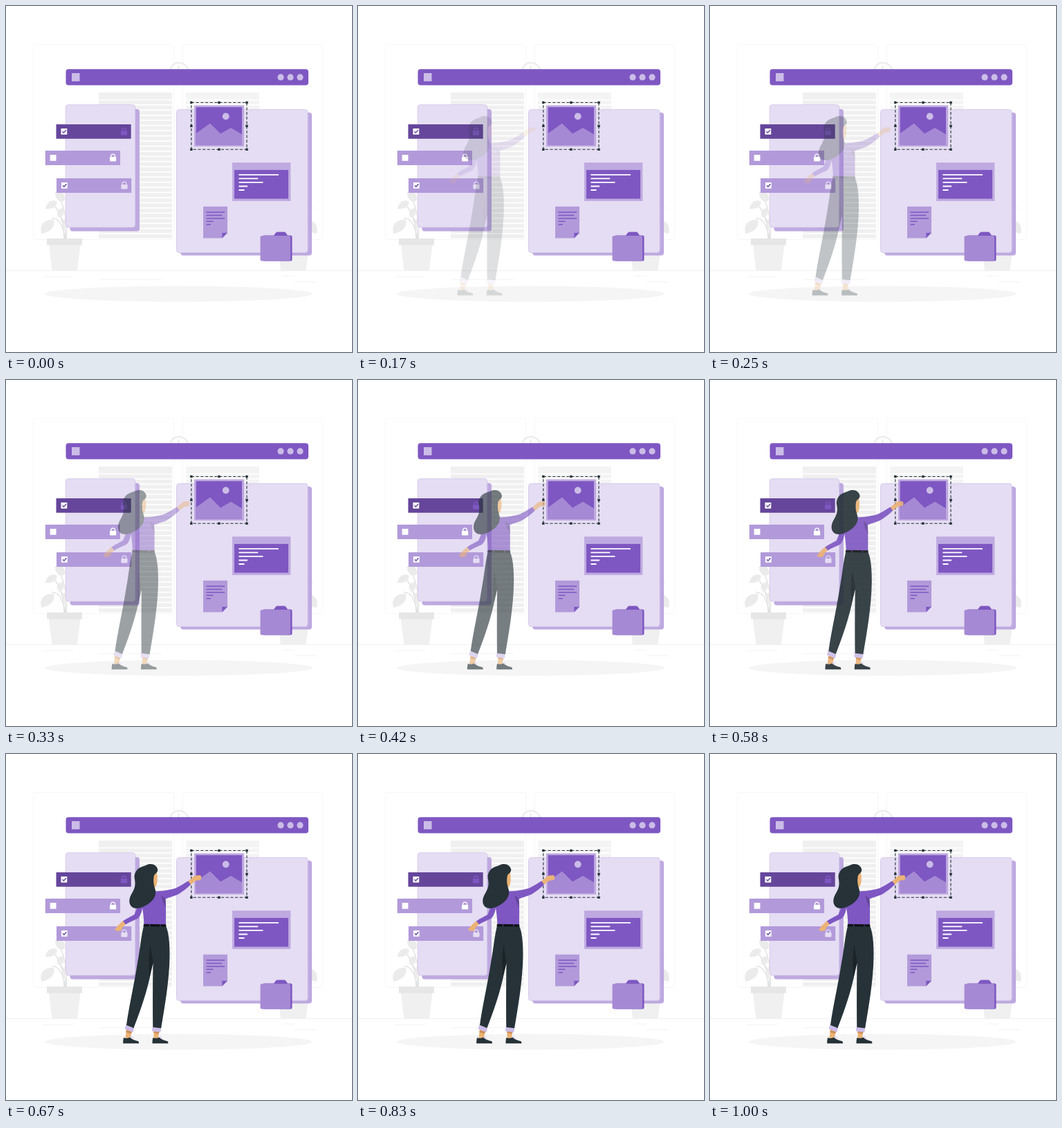
Write an HTML page that moves like this. It is 500 by 500 pixels and loops after 1.04 s.

```html
<!DOCTYPE html>
<html lang="en">
<head>
<meta charset="utf-8">
<title>Organising a page</title>
<style>
  html, body { margin: 0; width: 100%; height: 100%; overflow: hidden; background: #fff; }
  svg { display: block; width: 100vw; height: 100vh; }
  .main { fill: #7e57c2; }
  .t30 { fill: #a589d4; }
  .t40 { fill: #b29ada; }
  .t50 { fill: #bea9e0; }
  .t60 { fill: #cbbce7; }
  .t80 { fill: #e5ddf3; }
  .dark { fill: #263238; }
  .skin { fill: #ebb376; }
  .white { fill: #fff; }
  .line { fill: none; }
</style>
</head>
<body>
<svg viewBox="0 0 500 500">
  <defs>
    <g id="plant">
      <g class="line" stroke="#e0e0e0" stroke-width="1.3">
        <path d="M85 336C83 318 76 305 66 307M86 336C86 320 84 312 79 304M87 336C89 318 86 297 79 281M84 336C83 312 79 300 71 290"/>
      </g>
      <g fill="#ebebeb">
        <path d="M51 329C48 316 55 308 69 309C72 319 63 327 51 329Z"/>
        <path d="M57 293C58 284 65 279 73 282C76 289 67 294 57 293Z"/>
        <path d="M71 269C79 266 87 271 85 281C77 286 71 279 71 269Z"/>
        <path d="M77 306C71 300 73 293 82 292C86 299 82 304 77 306Z"/>
        <path d="M82 316C80 311 84 306 90 307C91 313 87 316 82 316Z"/>
      </g>
      <path fill="#f0f0f0" d="M62 345H107.500L103 382.500H66.500Z"/>
      <path fill="#e6e6e6" d="M59 336H110V345.500H59Z"/>
    </g>
    <g id="lock">
      <rect x="-4.600" y="-1.500" width="9.200" height="6.500" rx="1"/>
      <path d="M-2.900 -1V-2.400A2.900 2.900 0 0 1 2.900 -2.400V-1" fill="none" stroke-width="1.300"/>
    </g>
    <path id="shoe" d="M1 410C4 411 7 411 10 409.500C14 413 18 414 22 415Q23.500 416 23 418.200H.200Q0 414 1 410Z"/>
  </defs>

  <!-- room -->
  <g class="line" stroke="#f5f5f5" stroke-width=".8">
    <rect x="39.500" y="55.500" width="203" height="282" rx="2"/>
    <rect x="255.500" y="55.500" width="202" height="282" rx="2"/>
  </g>
  <g class="line" stroke="#ebebeb">
    <path stroke-width=".7" d="M0 382.500H500"/>
    <path stroke="#f2f2f2" stroke-width=".8" d="M53 391H97M135 395.500H225M399 390H417M417 398.500H449"/>
    <circle cx="250" cy="95.500" r="13.500" stroke-width="2.200"/>
    <path stroke-width="2" d="M249.500 86V96"/>
  </g>
  <g id="blinds" fill="#f0f0f0"></g>
  <use href="#plant"/>
  <use href="#plant" transform="matrix(-1 0 0 1 500 0)"/>
  <ellipse cx="249.500" cy="416" rx="193.500" ry="11.400" fill="#f5f5f5"/>

  <!-- title bar -->
  <rect class="main" x="86.500" y="91.300" width="350.500" height="23.200" rx="4"/>
  <g class="t60">
    <rect x="95" y="97" width="11.500" height="11.800"/>
    <circle cx="397" cy="102.900" r="4.600"/>
    <circle cx="411" cy="102.900" r="4.600"/>
    <circle cx="425" cy="102.900" r="4.600"/>
  </g>

  <!-- panels -->
  <g class="t50">
    <rect x="92.500" y="149" width="100.500" height="176.500" rx="4"/>
    <rect x="252.300" y="154" width="189.700" height="206.500" rx="4"/>
  </g>
  <g class="t80" stroke="#cbbce7" stroke-width=".7">
    <rect x="86.300" y="142.700" width="100.500" height="177.300" rx="4"/>
    <rect x="246.500" y="149.700" width="189.700" height="206.800" rx="4"/>
  </g>

  <!-- list rows -->
  <rect fill="#65469b" x="72.500" y="171" width="108.200" height="20.800"/>
  <rect class="t40" x="56.800" y="209" width="108.200" height="21"/>
  <rect class="t40" x="73" y="249" width="108.200" height="21"/>
  <path class="white" d="M79.500 177h8.800v8.800h-8.800zM63.700 215h8.800v8.800h-8.800zM80 255h8.800v8.800h-8.800z"/>
  <path class="line" stroke="#65469b" stroke-width="1.400" d="M81.500 181.200l1.900 2 3.500-4M82 259.200l1.900 2 3.500-4"/>
  <use href="#lock" x="170.500" y="181.800" fill="#7e57c2" stroke="#7e57c2" stroke-width="0"/>
  <use href="#lock" x="154.600" y="219.500" fill="#fff" stroke="#fff" stroke-width="0"/>
  <use href="#lock" x="171" y="259.500" fill="#e5ddf3" stroke="#e5ddf3" stroke-width="0"/>

  <!-- picture with selection -->
  <rect class="t50" x="272" y="143.500" width="72" height="59.500"/>
  <rect class="main" x="274.700" y="146.200" width="66.300" height="54.300"/>
  <path class="t30" d="M274.700 184L295 169.500L310 184.500L325 176L341 185.500V200.500H274.700Z"/>
  <circle class="t60" cx="317.700" cy="159.500" r="4.900"/>
  <rect class="line" x="267.800" y="139.500" width="80.200" height="67.800" stroke="#263238" stroke-width="1.100" stroke-dasharray="4.200 2.500"/>
  <g id="handles" class="dark"></g>

  <!-- text window -->
  <rect class="t50" x="327" y="226.300" width="84.300" height="55.500"/>
  <rect class="main" x="330" y="236.900" width="78" height="41.600"/>
  <path class="line" stroke="#fff" stroke-width="1.800" d="M336.400 243.900H394M336.400 249.400H364.200M336.400 254.900H371.400M336.400 260.500H349M336.400 266H344.500"/>

  <!-- note -->
  <path class="t40" d="M285 289.700H320V327.700L312.300 335.400H285Z"/>
  <path class="main" d="M312.300 327.700H320L312.300 335.400Z"/>
  <path class="line" stroke="#7e57c2" stroke-width="1.500" d="M289.500 298H316M289.500 302.500H312M289.500 306.900H316M289.500 311.300H299.500M289.500 315.700H296"/>

  <!-- folder -->
  <path class="main" d="M372 331.500H387L390 327.500Q390.800 326.500 392 326.500H402Q403.500 326.500 404.200 327.500L407 331.500H411Q413.500 331.500 413.500 334V366Q413.500 368.500 411 368.500H372Z"/>
  <rect class="t30" x="367.500" y="332" width="43.500" height="36.500" rx="2.500"/>

  <g id="woman">
    <!-- feet -->
    <path class="skin" d="M174 397L182 399L180 410.500Q176 413 172.500 410.500ZM213.500 399L221.500 400L220 410.500Q217 413 213.500 410.500Z"/>
    <path fill="#ce8f55" d="M174 399L182 401L181 404.500L173.500 402ZM213.500 400L221.500 401L221 404.500L213.500 403Z"/>
    <path class="t80" d="M179 410L181.500 406.500L185 412ZM220 410L222.500 406.500L227 412Z"/>
    <use href="#shoe" class="dark" x="169"/>
    <use href="#shoe" class="dark" x="211.300"/>
    <!-- trousers -->
    <path class="dark" d="M199 248.500C195 264 194 281 190 302C185 334 178 363 174 392L184.300 396.500C194 372 204 343 209.500 315L212.500 302C212 336 212 366 212.300 395.500L224 397C229 367 236 329 236.500 292C236.700 272 235 257 231 248.500Z"/>
    <path fill="#1b2429" d="M208.800 275C206 289 206.500 304 207 323L212.500 302C212.500 295 209.500 288 208.800 275Z"/>
    <path class="t60" d="M173.200 391.500L185 396.300L183.500 402.300L171.700 397.500ZM211.500 394.800L224.200 396.300L223.300 402.300L211 400.500Z"/>
    <!-- hands -->
    <path class="skin" d="M169 241L162 247.500L157.300 253.500Q158 256.500 165 255.500Q167.500 254.500 168.500 250L174 245.500Z"/>
    <path class="skin" d="M262 185L268.500 179.500Q271 176 275 175.500L281 175.200Q283.500 179 281 182L274 183.300L266 189.500Z"/>
    <!-- blouse -->
    <path class="main" d="M214 198C227 199 236 196 245 194C252 191 257 187 263.200 183.500L267 188.500C262 194 255 199 248.500 203C241 206 236 207 230.500 209.500C231.500 222 231 235 231 247H199.500C199 238 198.500 230 197 222.500C196 229 194 235 190 238C184 241 178 243 173 246.300L169 241.500C175 237 181 235 185.500 232C188 226 190 221 193 213C200 203 206 198 214 198Z"/>
    <path fill="#65469b" d="M224.500 204L230.500 209.500L231 222C228 217 225.500 211 224.500 204Z"/>
    <path fill="#0c1114" d="M199 245.800L231.300 246.300V249.500L198.500 249Z"/>
    <path class="line" stroke="#7e57c2" stroke-width=".7" d="M207.500 246V249.200M223 246.200V249.400"/>
    <!-- head -->
    <path class="skin" d="M210 172L217.500 170C219.500 177 219.500 188 215.500 192.500L210 193Z"/>
    <path class="dark" d="M219.300 167.500C218.500 162 214 159 209 159C204 159 202 161.500 197.500 162.500C189 165 184 173 186 181C188 191 185 196 181 203C177 210 177 219 184 222.200C193 225 204 219 211 212C217 206 217 199 215 193.500C213 188 213 182 213.500 178C214 172 219 173 219.300 167.500Z"/>
  </g>
</svg>
<script>
  const $ = id => document.getElementById(id);
  const rect = (x, y, w, h) => `<rect x="${x}" y="${y}" width="${w}" height="${h}"/>`;

  const blind = (x, slats) => rect(x, 125, 106, 10) +
    Array.from({ length: slats }, (_, i) => rect(x, 136.4 + i * 7.44, 106, 5.7)).join('');
  $('blinds').innerHTML = blind(134, 27) + `<g fill="#f4f4f4">${blind(260, 3)}</g>`;

  for (const x of [267.8, 307.9, 348])
    for (const y of [139.5, 173.4, 207.3])
      if (x !== 307.9 || y !== 173.4) $('handles').innerHTML += rect(x - 1.7, y - 1.7, 3.4, 3.4);

  // cubic-bezier(.36, -.01, .5, 1.38): eases in and overshoots
  const curve = (s, a, b) => 3 * (1 - s) ** 2 * s * a + 3 * (1 - s) * s * s * b + s ** 3;
  function ease(t) {
    let lo = 0, hi = 1;
    for (let i = 0; i < 24; i++) {
      const mid = (lo + hi) / 2;
      if (curve(mid, .36, .5) < t) lo = mid; else hi = mid;
    }
    return curve(hi, -.01, 1.38);
  }

  const LOOP = 1040, FPS = 24, STEPS = 25;
  const start = performance.now();
  function draw() {
    const t = Math.max(0, performance.now() - start) % LOOP;
    const step = Math.min(STEPS - 1, Math.floor(t * FPS / 1000 + .15));
    const p = step < 2 ? 0 : ease((step + 1) / STEPS);
    $('woman').setAttribute('transform', `translate(${30 * (p - 1)})`);
    $('woman').setAttribute('opacity', Math.min(1, p));
    requestAnimationFrame(draw);
  }
  draw();
</script>
</body>
</html>
```
